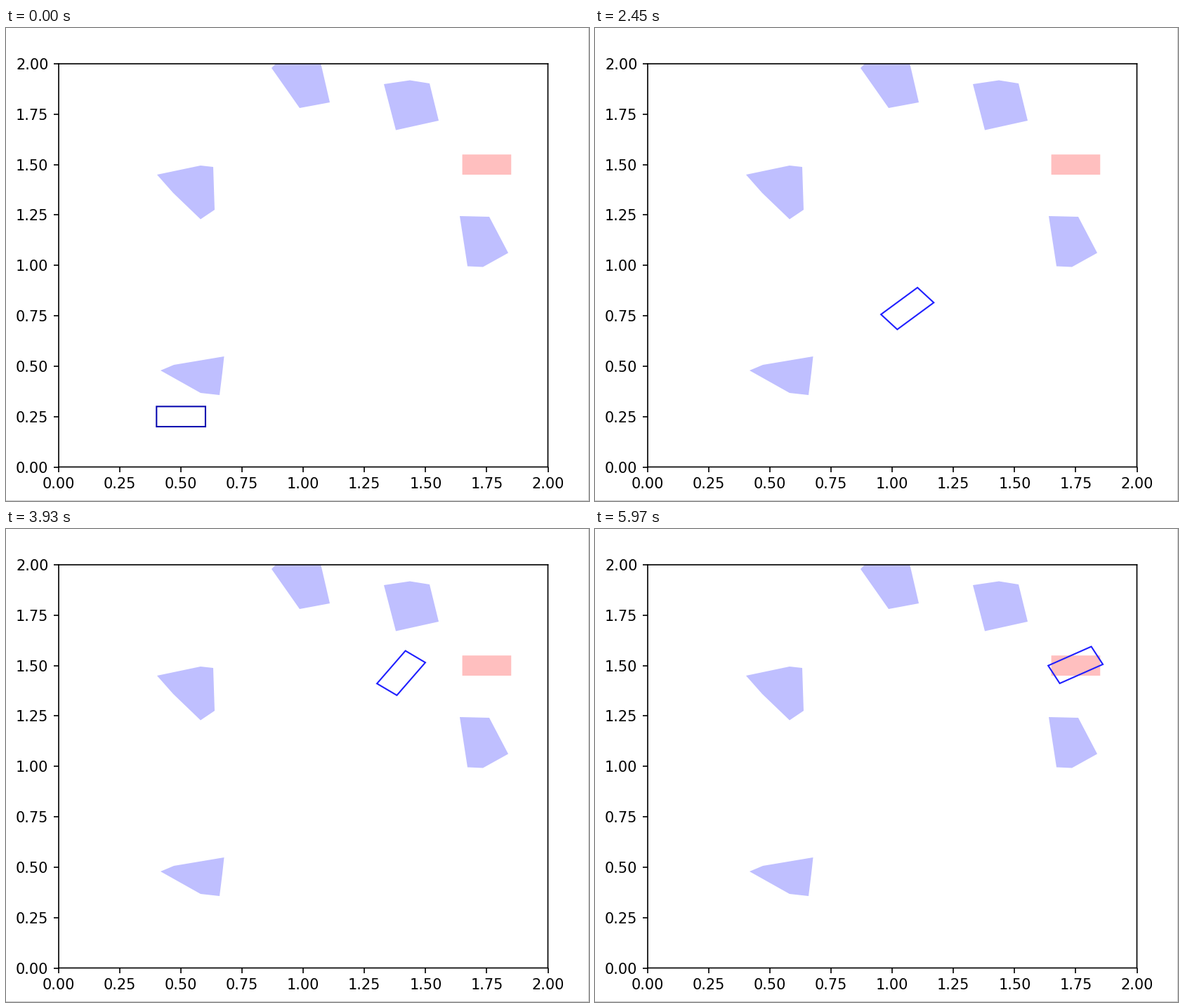
Recreate the animation shown at these times as a matplotlib script. Size 830 by 674 pixels, loop 7.16 s.

```python
import numpy as np
import matplotlib.pyplot as plt
from matplotlib.animation import FuncAnimation
from matplotlib.patches import Polygon, Rectangle

W, H = 830, 674
LEFT, RIGHT, TOP, BOTTOM = 75, 771.5, 51, 625.5
LOOP, INTERVAL = 7160, 20
START, END, STEPS = 810, 5970, 76  # the drive in ms and its number of steps
SCALE = 1.5  # screen scaling of the default line and font sizes

# Obstacle outlines in stage pixels
OBSTACLES = [
    [(378, 57), (394, 41), (446, 41), (461, 106), (418, 114)],
    [(538, 80), (575, 74.5), (603, 79), (616, 132), (555, 145.5)],
    [(215, 209), (277, 196), (295, 198), (297, 259), (277, 272.5), (238, 235)],
    [(646, 268), (688, 269), (715, 320.5), (679, 340.5), (657, 339.5)],
    [(220, 488), (239, 480), (310.5, 468), (308, 491), (304, 523), (277, 520)],
]

# Waypoints of the drive: step, x, y, heading in degrees
WAYPOINTS = np.array([
    (-1, .5, .25, 0), (6, .702, .289, 40), (16, .886, .583, 57),
    (25, 1.087, .808, 40), (32, 1.239, .967, 79), (46, 1.4, 1.463, 54.4),
    (55, 1.644, 1.638, 12.1), (60, 1.796, 1.692, 30),
    (71, 1.637, 1.394, 58), (STEPS, 1.749, 1.503, 28.2)])


def to_data(points):
    x, y = np.array(points, float).T
    return np.column_stack([2 * (x - LEFT) / (RIGHT - LEFT),
                            2 * (BOTTOM - y) / (BOTTOM - TOP)])


def unit(angle):
    return np.array([np.cos(angle), np.sin(angle)])


def pose_at(step):
    """Position and heading on a smooth curve, driven forwards or in reverse."""
    i = np.searchsorted(WAYPOINTS[1:-1, 0], step, side="right")
    (s0, *p0, a0), (s1, *p1, a1) = WAYPOINTS[i:i + 2]
    p0, p1 = np.array(p0), np.array(p1)
    chord = p1 - p0
    d0, d1 = unit(np.radians(a0)), unit(np.radians(a1))
    gear = np.sign(chord @ (d0 + d1))
    m0, m1 = (gear * np.hypot(*chord) * d for d in (d0, d1))

    u = (step - s0) / (s1 - s0)
    bend = 3 * chord - 2 * m0 - m1
    twist = m0 + m1 - 2 * chord
    place = p0 + u * (m0 + u * (bend + u * twist))
    dx, dy = gear * (m0 + u * (2 * bend + 3 * u * twist))
    return place, np.arctan2(dy, dx)


def car_corners(place, heading):
    ahead, side = 0.1 * unit(heading), 0.05 * unit(heading + np.pi / 2)
    return place + [ahead + side, ahead - side, -ahead - side, side - ahead]


plt.rcParams.update({"font.family": "DejaVu Sans", "path.snap": False})
fig = plt.figure(figsize=(W / 100, H / 100), dpi=100, facecolor="white")
ax = fig.add_axes([LEFT / W, 1 - BOTTOM / H,
                   (RIGHT - LEFT) / W, (BOTTOM - TOP) / H])
ticks = np.arange(0, 2.01, .25)
ax.set(xlim=(0, 2), ylim=(0, 2), xticks=ticks, yticks=ticks)
ax.xaxis.set_major_formatter("{x:.2f}")
ax.yaxis.set_major_formatter("{x:.2f}")
ax.tick_params(labelsize=10 * SCALE, length=3.5 * SCALE,
               width=.8 * SCALE, pad=3.5 * SCALE)
for spine in ax.spines.values():
    spine.set_linewidth(.8 * SCALE)

for outline in OBSTACLES:
    ax.add_patch(Polygon(to_data(outline), fc="#bfbfff", ec="none"))
ax.add_patch(Rectangle((1.65, 1.45), .2, .1, fc="#ffbfbf", ec="none"))
car = ax.add_patch(Polygon(car_corners(*pose_at(-1)), fill=False,
                           lw=SCALE, joinstyle="miter", zorder=3))

# Thin window edge on the right and bottom
for x, y, w, h in [(W - 1, 0, 1, H), (0, 0, W, 1)]:
    fig.add_artist(Rectangle((x / W, y / H), w / W, h / H,
                             fc="#c8c8c8", ec="none"))


def update(frame):
    t = (frame + .5) * INTERVAL
    step = np.floor((t - START + 8) * STEPS / (END - START))
    car.set_xy(car_corners(*pose_at(np.clip(step, -1, STEPS))))
    car.set_edgecolor("#1f1fff" if step >= 0 else "#0a0ab0")
    return car,


anim = FuncAnimation(fig, update, frames=LOOP // INTERVAL, interval=INTERVAL,
                     repeat=True, repeat_delay=0, blit=False)
plt.show()
```
